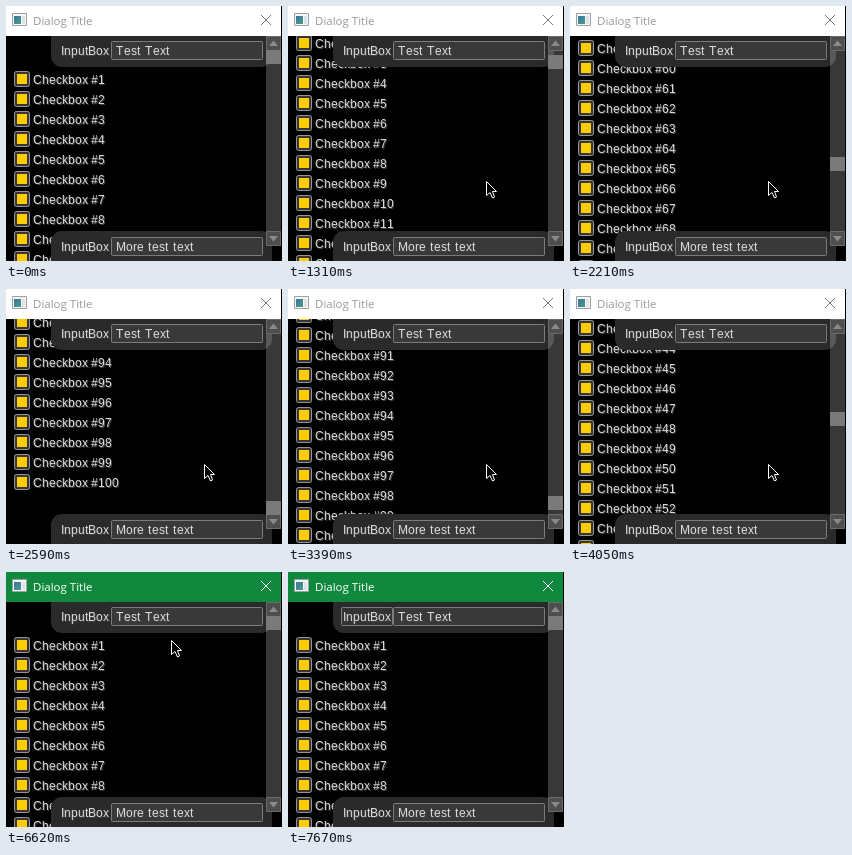
Animation, 276 px wide and 255 px high, one loop 8000 ms. Source, as an HTML page with a canvas:

```html
<!DOCTYPE html>
<html lang="en">
<head>
<meta charset="utf-8">
<title>Dialog</title>
<style>
  html, body { margin: 0; width: 276px; height: 255px; overflow: hidden; background: #000; }
  canvas { display: block; }
</style>
</head>
<body>
<canvas id="stage" width="276" height="255"></canvas>
<script>
const g = document.getElementById('stage').getContext('2d');
const LOOP = 8000, TICK = 130, MAX_SCROLL = 1860;
const ENTER = 760, FOCUS = 6120, LEAVE = 7520, LABEL_FOCUS = 7670;

// Key points: time, position, and the easing power used to get there.
const scrollKeys = [
  { t: 1180, at: [0] },
  { t: 1700, at: [298], ease: 1.2 },
  { t: 2590, at: [MAX_SCROLL] },
  { t: 2890, at: [MAX_SCROLL] },
  { t: 3390, at: [1807] },
  { t: 4050, at: [874], ease: 1.4 },
  { t: 4470, at: [0], ease: .9 }
];

const pointerKeys = [
  { t: 640, at: [206, 222] },
  { t: 1000, at: [197, 174] },
  { t: 4870, at: [197, 174] },
  { t: 5120, at: [186, 109] },
  { t: 5390, at: [184, 78] },
  { t: 5750, at: [197, 49] },
  { t: 6350, at: [197, 49] },
  { t: 6480, at: [253, 60] },
  { t: 6620, at: [164, 67] },
  { t: 6890, at: [257, 60] },
  { t: 7130, at: [217, 58] },
  { t: 7400, at: [210, 59] }
];

// Position between the key points, moving in steps of about one tick.
function follow(keys, t) {
  const next = keys.findIndex(key => key.t > t);
  if (next === 0) return keys[0].at;
  if (next < 0) return keys[keys.length - 1].at;
  const a = keys[next - 1], b = keys[next];
  const steps = Math.round((b.t - a.t) / TICK);
  const p = Math.floor(steps * (t - a.t) / (b.t - a.t)) / steps;
  const eased = p ** (b.ease || 1);
  return a.at.map((v, i) => Math.round(v + (b.at[i] - v) * eased));
}

function rect(x, y, w, h, fill) {
  g.fillStyle = fill;
  g.fillRect(x, y, w, h);
}

function box(x, y, w, h, radius, fill, stroke) {
  g.beginPath();
  g.roundRect(x + .5, y + .5, w - 1, h - 1, radius);
  g.fillStyle = fill;
  g.fill();
  g.strokeStyle = stroke;
  g.lineWidth = 1;
  g.stroke();
}

function poly(points, fill, stroke) {
  g.beginPath();
  points.forEach(([x, y]) => g.lineTo(x, y));
  g.closePath();
  g.fillStyle = fill;
  g.fill();
  if (!stroke) return;
  g.strokeStyle = stroke;
  g.lineWidth = 1;
  g.stroke();
}

// Glyphs advance by whole pixels; input text is set a little wider.
function write(text, x, y, snap = Math.round) {
  g.font = '12px "Liberation Sans", Arial, sans-serif';
  for (const ch of text) {
    g.fillStyle = '#444';
    g.fillText(ch, x + 1, y + 1);
    g.fillStyle = '#dcdcdc';
    g.fillText(ch, x, y);
    x += snap(g.measureText(ch).width - .1);
  }
}

function drawList(offset) {
  for (let n = 1; n <= 100; n++) {
    const y = 73 + 20 * (n - 1) - offset;
    if (y < 15 || y > 270) continue;
    box(8, y - 8, 16, 16, 2, '#363636', '#969696');
    rect(11, y - 5, 10, 10, '#ffcc00');
    write('Checkbox #' + n, 27, y + 5);
  }
}

function drawPanel(y, h, corners, fieldY, text, focused) {
  g.fillStyle = '#2a2a2a';
  g.beginPath();
  g.roundRect(45, y, 221, h, corners);
  g.fill();
  box(105, fieldY, 152, 19, 1, '#393939', '#7c7c7c');
  if (focused) box(53, fieldY, 52, 19, 1, '#333', '#7c7c7c');
  write('InputBox', 55, fieldY + 14);
  write(text, 110, fieldY + 14, Math.ceil);
}

function drawScrollbar(offset) {
  rect(260, 30, 15, 210, 'rgba(255, 255, 255, .22)');
  for (const [y, dir] of [[30, -1], [225, 1]]) {
    const mid = y + 7.5;
    box(260, y, 15, 15, 0, '#4e4e4e', '#6a6a6a');
    poly([[267.5, mid + 3 * dir], [272, mid - 2.5 * dir], [263, mid - 2.5 * dir]], '#8a8a8a');
  }
  rect(260, Math.round(44 + 167.5 * offset / MAX_SCROLL), 15, 14, '#7a7a7a');
}

function drawTitle(active) {
  rect(0, 0, 275, 30, active ? '#10893e' : '#fff');
  box(6, 7, 15, 13, 0, '#f4f6f7', '#9aa0a4');
  const teal = g.createLinearGradient(8, 10, 14, 18);
  teal.addColorStop(0, '#3b75a0');
  teal.addColorStop(1, '#4a9a86');
  rect(8, 10, 7, 8, teal);
  rect(16, 10, 3, 8, '#dde3e7');
  g.fillStyle = active ? '#fff' : '#999';
  g.font = '11.5px "Open Sans", "Noto Sans", sans-serif';
  g.fillText('Dialog Title', 27, 19);
  g.strokeStyle = active ? '#fff' : '#777';
  g.lineWidth = 1;
  g.beginPath();
  g.moveTo(255, 9); g.lineTo(265, 19);
  g.moveTo(265, 9); g.lineTo(255, 19);
  g.stroke();
}

function drawPointer([x, y]) {
  g.save();
  if (y < 54) {
    g.translate(x, y);
    rect(0, -7, 1, 14, '#d0d0d0');
    for (const end of [-8, 7]) {
      rect(-4, end, 4, 1, '#d0d0d0');
      rect(1, end, 4, 1, '#d0d0d0');
    }
  } else {
    g.translate(x + 1.5, y + 1.5);
    poly([[0, 0], [0, 14], [3.5, 11], [6, 16.5], [8, 15.5], [6, 10], [10, 10]], '#000', '#fff');
  }
  g.restore();
}

function draw(t) {
  const [offset] = follow(scrollKeys, t);
  rect(0, 0, 276, 255, '#000');
  drawList(offset);
  drawPanel(30, 31, [0, 0, 11, 11], 35, 'Test Text', t >= LABEL_FOCUS);
  drawPanel(225, 30, [11, 11, 0, 0], 231, 'More test text', false);
  drawScrollbar(offset);
  drawTitle(t >= FOCUS);
  if (t >= ENTER && t < LEAVE) drawPointer(follow(pointerKeys, t));
}

const start = performance.now();
function tick() {
  draw((performance.now() - start) % LOOP);
  requestAnimationFrame(tick);
}
tick();
</script>
</body>
</html>
```
